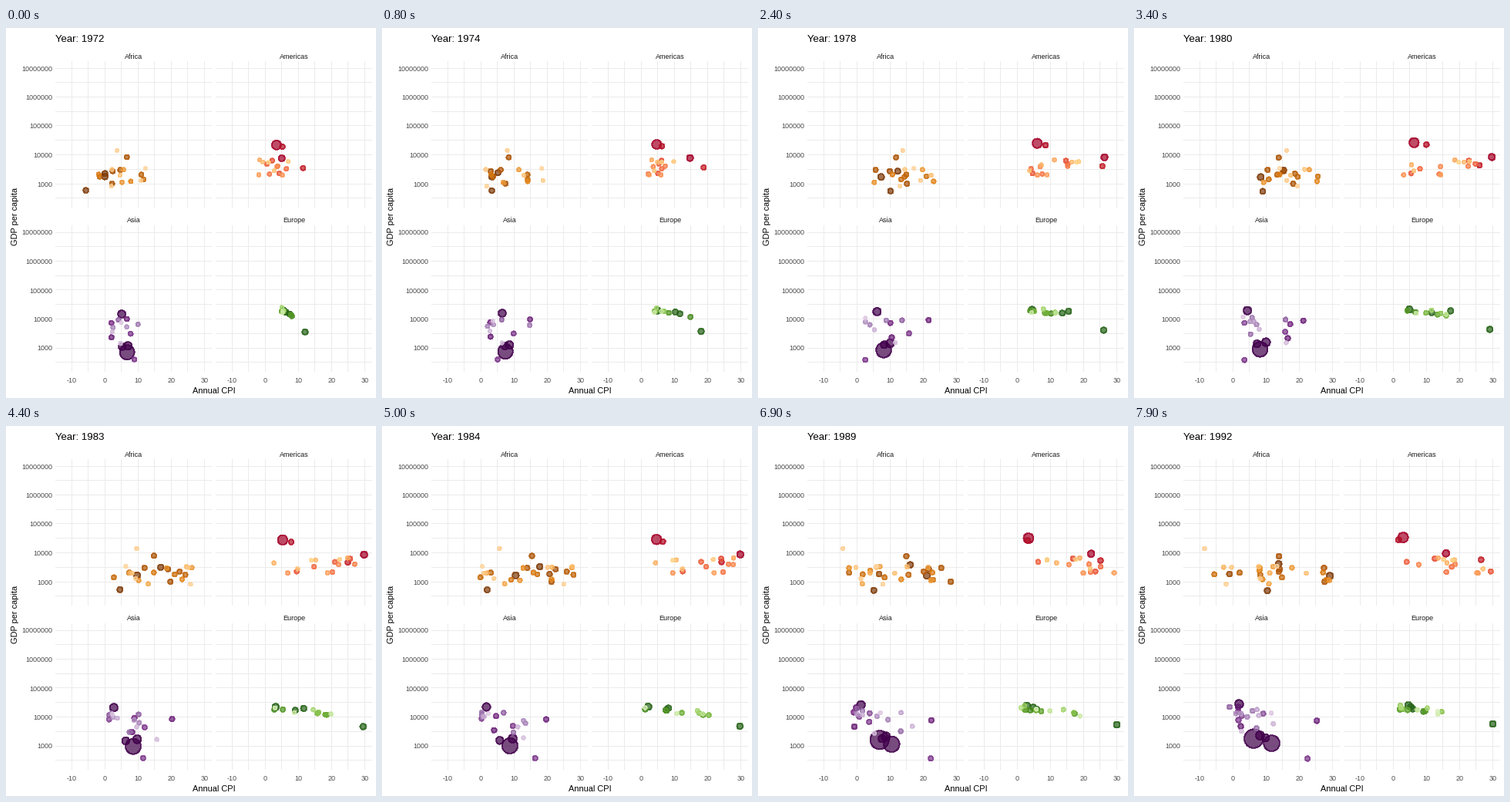
These frames come from a looping animation (480x480 px, 8000 ms). A matplotlib script:

```python
import numpy as np
import matplotlib.pyplot as plt
from matplotlib.animation import FuncAnimation
from matplotlib.colors import LinearSegmentedColormap

plt.rcParams["font.family"] = "Liberation Sans"
SIZE, DPI, FRAMES = 480, 72, 80
KNOTS = [0, 15, 34, 57, 79]
CAP = 30  # highest CPI on the chart

fig = plt.figure(figsize=(SIZE / DPI, SIZE / DPI), dpi=DPI, facecolor="white")
ax = fig.add_axes([0, 0, 1, 1])
ax.set(xlim=(-.5, SIZE - .5), ylim=(SIZE - .5, -.5))
ax.axis("off")


def px(cpi):
    return 127.7 + 4.31 * cpi


def py(log_gdp):
    return 201.5 - 37.5 * (log_gdp - 3)


def label(x, y, s, size=9, color="#4D4D4D", **kw):
    kw = {"ha": "center", "va": "baseline", **kw}
    return ax.text(x, y, s, fontsize=size, color=color, **kw)


def line(xs, ys):
    ax.plot(xs, ys, color="#EBEBEB", lw=1, snap=False, solid_capstyle="butt", zorder=0)


bubbles = []


class Region:
    """One facet with its grid, title, colours and bubbles."""

    def __init__(self, name, dx, dy, *stops):
        self.dx, self.dy = dx, dy
        self.cmap = LinearSegmentedColormap.from_list(name, stops)
        for cpi in range(-10, CAP + 1, 5):
            x = round(px(cpi)) + dx
            line([x, x], [42.5 + dy, 232.5 + dy])
        for p in np.arange(2.5, 7.1, .5):
            y = round(py(p)) + dy
            line([63.5 + dx, 266.5 + dx], [y, y])
        label(165 + dx, 39 + dy, name, color="#1A1A1A")

    def add(self, r, born, path):
        color = self.cmap(float(np.clip((r - 2.55) / 1.35, 0, 1)), alpha=.7)

        def place(f):
            if f < born:
                return np.nan, np.nan
            cpi, log_gdp = path(f)
            return px(min(cpi, CAP)) + self.dx, py(log_gdp) + self.dy
        bubbles.append((r, color, place))

    def lead(self, r, cpi, gdp, born=0):
        """A large country following a few key values."""
        self.add(r, born, lambda f: (np.interp(f, KNOTS, cpi),
                                     np.interp(f, [0, FRAMES - 1], gdp)))

    def crowd(self, seed, n, low, high, gdp, skew=1, tilt=0, drift=0, late=0, top=3.7):
        """Small countries sweeping back and forth through a changing CPI band."""
        rng = np.random.default_rng(seed)
        for r in np.linspace(2.65, top, n):
            phase, speed = rng.uniform(0, 2), rng.uniform(.8, 2.5)
            level = rng.uniform(*gdp)
            born = rng.uniform(20, 70) * (rng.random() < late)

            def path(f, phase=phase, speed=speed, level=level):
                t = f / FRAMES
                q = abs((phase + speed * t) % 2 - 1) ** skew
                lo, hi = np.interp(f, KNOTS, low), np.interp(f, KNOTS, high)
                return lo + (hi - lo) * q, level + tilt * q + drift * t
            self.add(r, born, path)


africa = Region("Africa", 0, 0, "#FEE0B6", "#FDB863", "#E08214", "#B35806", "#7F3B08")
africa.lead(4.6, [0, 6.3, 8.4, 11.4, 29.2], [3.25, 3.2])
africa.lead(4.2, [0, 9.6, 15.3, 18.8, 13.8], [3.35, 3.62])
africa.lead(4, [-5.7, 11.2, 9, -1.2, 10.4], [2.77, 2.69])
africa.lead(3.6, [6.6, 10, 13.8, 16.1, 13.9], [3.92, 3.88])
africa.lead(2.7, [3.7, 11.7, 16.2, 1, -8.5], [4.15, 4.15])
africa.crowd(4, 26, [-2, 4, 6, -5, -6], [14, 24, 26, 29, 30], (2.78, 3.55), late=.4)

americas = Region("Americas", 208, 0, "#FEE090", "#FDAE61", "#F46D43", "#D73027", "#A50026")
americas.lead(6.7, [3.4, 5.8, 6.3, 3.9, 3], [4.34, 4.53])
americas.lead(3.8, [5.2, 7.2, 10, 5, 1.6], [4.28, 4.45])
americas.lead(4.7, [5, 23.2, 29.7, 29.9, 15.9], [3.88, 3.98])
americas.lead(3.7, [11.4, 25.3, 26, 23.4, 26.5], [3.54, 3.76])
americas.crowd(7, 15, [-2, 4, 3, 1, 2], [10, 13, 25, 30, 31], (3.3, 3.87), late=.1, top=3.4)

asia = Region("Asia", 0, 213, "#E7D4E8", "#C2A5CF", "#9970AB", "#762A83", "#40004B")
asia.lead(10.4, [6.7, 8, 8.2, 9, 11.7], [2.85, 3.09])
asia.lead(12.2, [7, 7, 7, 7.5, 6.3], [2.9, 3.25], born=63)
asia.lead(5.6, [5.1, 7.6, 4.4, .5, 1.9], [4.17, 4.45])
asia.lead(5.8, [7, 10, 10, 9.4, 8.2], [3.07, 3.36])
asia.lead(5.2, [5.2, 9.1, 7.3, 5, 9.8], [3.04, 3.28])
asia.lead(3.6, [6.6, 22, 21.2, 19, 25.3], [4, 3.87])
asia.lead(3.5, [8.9, 1.7, 3.5, 22, 22.5], [2.6, 2.56])
asia.crowd(2, 17, [2, 2, 3, -1, -1], [15, 16, 18, 18, 18], (3.15, 4.1),
           skew=2, tilt=-.2, drift=.35, late=.35)

europe = Region("Europe", 208, 213, "#E6F5D0", "#B8E186", "#7FBC41", "#4D9221", "#276419")
europe.lead(4.8, [5.6, 4.2, 4.9, .9, 4.6], [4.28, 4.4])
europe.lead(4.2, [6.3, 13.8, 17.3, 4.2, 5.3], [4.23, 4.35])
europe.lead(4.1, [7.4, 15.4, 11.6, 5.8, 5.9], [4.17, 4.28])
europe.lead(4.3, [12, 23.3, 29.1, 30, 30], [3.55, 3.76])
europe.crowd(5, 13, [5, 3, 4, 0, 2], [9, 22, 22, 20, 22], (4.22, 4.42),
             skew=2, tilt=-.22, late=.2)

for dx in (0, 208):
    for cpi in range(-10, CAP + 1, 10):
        label(px(cpi) + dx, 459, str(cpi))
for dy in (0, 213):
    for p in range(3, 8):
        label(59.5, py(p) + 3.5 + dy, str(10 ** p), ha="right")
label(269, 473, "Annual CPI", 11, "black")
label(12, 244, "GDP per capita", 11, "black", rotation=90, va="center")
title = label(64, 17, "", 13.2, "black", ha="left")

bubbles.sort(key=lambda b: -b[0])
radii = np.array([b[0] for b in bubbles])
colors = [b[1] for b in bubbles]
dots = ax.scatter(radii * 0, radii * 0, s=radii, c=colors, edgecolors=colors,
                  linewidths=1, antialiased=False, zorder=3)


def update(f):
    dots.set_offsets(np.ma.masked_invalid([place(f) for _, _, place in bubbles]))
    grow = .96 + .08 * f / (FRAMES - 1)
    dots.set_sizes((2 * radii * grow - 1) ** 2)
    title.set_text(f"Year: {int(1972.1 + .2525 * f)}")
    return dots, title


anim = FuncAnimation(fig, update, frames=FRAMES, interval=100, repeat=True)
plt.show()
```
